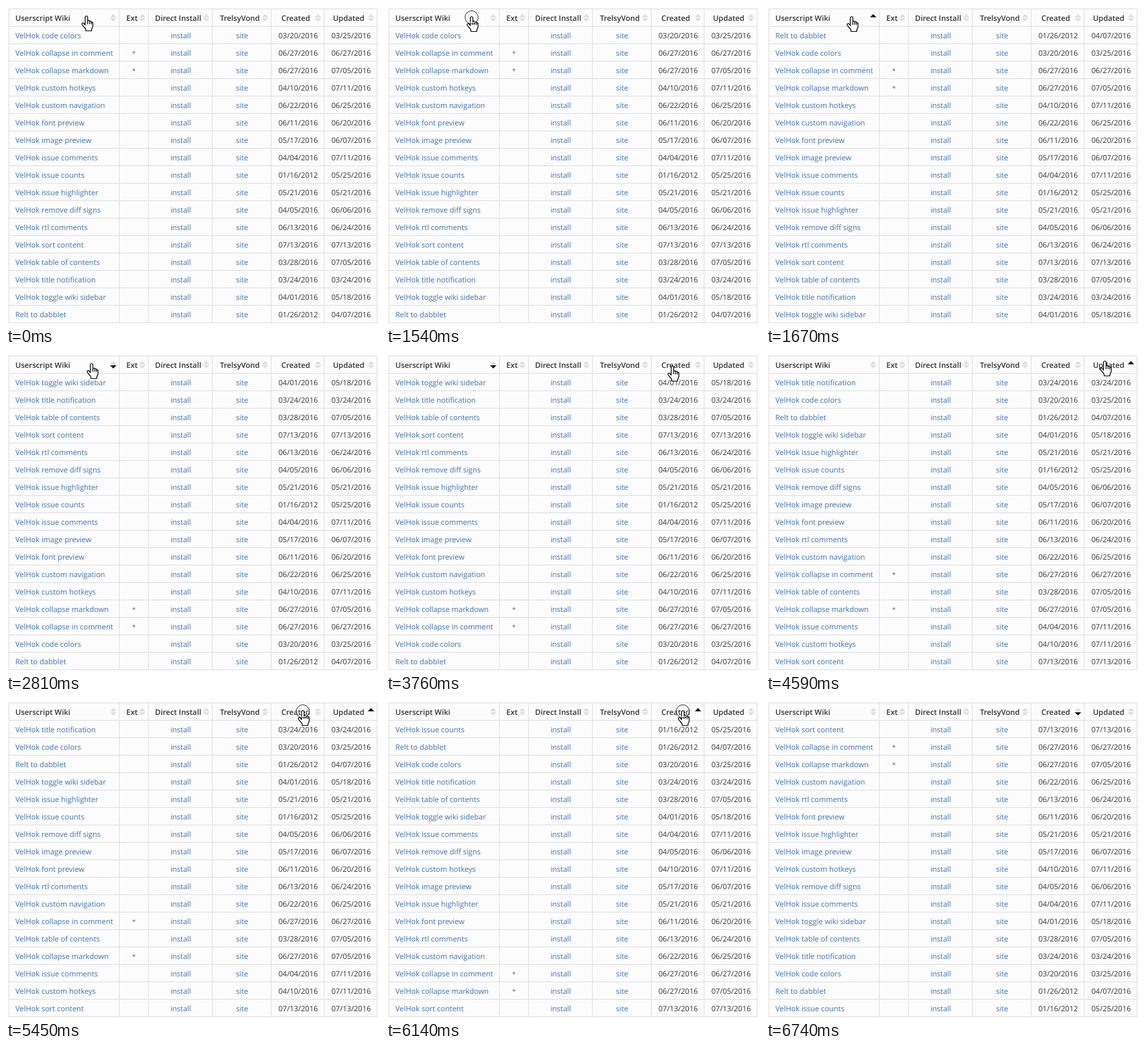
Animation of 579x494 px, one loop 7830 ms. Source, as an HTML page:

```html
<!DOCTYPE html>
<html lang="en">
<head>
<meta charset="utf-8">
<title>Sortable script table</title>
<style>
html, body { margin: 0; width: 100%; height: 100%; overflow: hidden; background: #fff; }
svg { display: block; }
text { font: 11.5px "Open Sans", "Noto Sans", sans-serif; fill: #333; text-rendering: geometricPrecision; }
.mid { text-anchor: middle; }
.link { fill: #3c72b4; }
.star { font-size: 10px; fill: #666; }
.head { font-size: 11.7px; font-weight: 600; }
</style>
</head>
<body>
<svg id="stage" width="579" height="494" viewBox="0 0 579 494">
  <rect x="4" y="4" width="571" height="487" fill="#fcfcfc"/>
  <path id="grid" fill="none" stroke="#ddd"/>
  <g id="table"></g>
  <path id="hand" fill="#fff" stroke="#000" stroke-width="1.2" stroke-linejoin="round"
    d="M5.5 14.5V2.5a2 2 0 0 1 4 0V8.5a1.6 1.6 0 0 1 3 0V9.5a1.4 1.4 0 0 1 2.7 0V11a1.2 1.2 0 0 1 2.3 0V15.5c0 3-2 4-2 6V23.5H6.5V21C5 18 .9 15 .6 13.2c-.3-2 2-2.5 3.1-1.4zM9.5 8.5V13M12.5 9.5V13M15.2 11V13.5"/>
  <path id="arrow" fill="#fff" stroke="#000" d="M.5.8V16.4L4.1 13 6.4 18.4 8.8 17.4 6.5 12.2H11.4z"/>
  <g id="ring" fill="none"><circle r="10" stroke="#000"/><circle r="9" stroke="#fff"/></g>
</svg>
<script>
const LOOP = 7830, ROW = 27, TOP = 4;
const edges = [4, 175, 220, 319, 410, 492, 574];
const titles = ["Userscript Wiki", "Ext", "Direct Install", "TrelsyVond", "Created", "Updated"];
const titleX = [14.5, 195, 266.5, 362, 448.5, 530.5];
const cellX = [14.5, 198, 270.5, 365.5, 452.3, 534.3];
const cellClass = ["link", "mid star", "mid link", "mid link", "mid", "mid"];

// name | created | updated, with * marking an extension
const rows = `VelHok code colors|03/20/2016|03/25/2016
VelHok collapse in comment*|06/27/2016|06/27/2016
VelHok collapse markdown*|06/27/2016|07/05/2016
VelHok custom hotkeys|04/10/2016|07/11/2016
VelHok custom navigation|06/22/2016|06/25/2016
VelHok font preview|06/11/2016|06/20/2016
VelHok image preview|05/17/2016|06/07/2016
VelHok issue comments|04/04/2016|07/11/2016
VelHok issue counts|01/16/2012|05/25/2016
VelHok issue highlighter|05/21/2016|05/21/2016
VelHok remove diff signs|04/05/2016|06/06/2016
VelHok rtl comments|06/13/2016|06/24/2016
VelHok sort content|07/13/2016|07/13/2016
VelHok table of contents|03/28/2016|07/05/2016
VelHok title notification|03/24/2016|03/24/2016
VelHok toggle wiki sidebar|04/01/2016|05/18/2016
Relt to dabblet|01/26/2012|04/07/2016`.split("\n").map(line => {
  const [name, created, updated] = line.split("|");
  return [name.replace("*", ""), name.endsWith("*") ? "*" : "", "install", "site", created, updated];
});

// [time, column, direction]
const sorts = [[0, -1, 1], [1670, 0, 1], [2810, 0, -1], [4590, 5, 1], [5580, 4, 1], [6290, 4, -1]];
// [time, left, top] of the hand
const poses = [[0, 117, 15], [280, 119, 15], [420, 125, 16], [3380, 145, 17], [3520, 212, 18],
  [3640, 345, 20], [3760, 436, 20], [3890, 472, 14], [4040, 499, 13], [4160, 514, 12],
  [4310, 517, 12], [5150, 463, 16], [5300, 452, 16]];
// [from, to] of each mouse press
const presses = [[1540, 1670], [4310, 4590], [5450, 5580], [6140, 6290]];

const $ = id => document.getElementById(id);
function add(parent, tag, attrs, content = "") {
  const el = document.createElementNS("http://www.w3.org/2000/svg", tag);
  for (const key in attrs) el.setAttribute(key, attrs[key]);
  el.textContent = content;
  return parent.appendChild(el);
}
const move = (el, x, y) => el.setAttribute("transform", `translate(${x} ${y})`);
const show = (el, on) => el.setAttribute("visibility", on ? "visible" : "hidden");
const latest = (list, t) => list.findLast(item => item[0] <= t);

let lines = edges.map(x => `M${x + .5} 4V491`).join("");
for (let i = 0; i <= 18; i++) lines += `M4 ${TOP + i * ROW + .5}H575`;
$("grid").setAttribute("d", lines);

const icons = titles.map((title, i) => {
  add($("table"), "text", { x: titleX[i], y: 23, class: i ? "head mid" : "head" }, title);
  const x = edges[i + 1] - 9;
  return ["M-5 17.5H5L0 12.5z", "M-5 19H5L0 24z"].map(d =>
    add($("table"), "path", { d, transform: `translate(${x})` }));
});
const rowEls = rows.map(row => {
  const g = add($("table"), "g");
  row.forEach((value, i) => add(g, "text", { x: cellX[i], y: 19, class: cellClass[i] }, value));
  return g;
});

// Dates compare by year first; ties keep their previous order.
const sortKey = (i, col) => col ? rows[i][col].slice(6) + rows[i][col] : rows[i][0];
let order = rows.map((_, i) => i);
for (const sort of sorts) {
  const [, col, dir] = sort;
  if (col >= 0) order = [...order].sort((a, b) => {
    const p = sortKey(a, col), q = sortKey(b, col);
    return p === q ? 0 : p < q ? -dir : dir;
  });
  sort.push(order);
}

let shown;
function applySort(sort) {
  if (sort === shown) return;
  shown = sort;
  const [, col, dir, list] = sort;
  list.forEach((row, i) => move(rowEls[row], 0, TOP + ROW * (i + 1)));
  icons.forEach(([up, down], i) => {
    const active = i === col;
    up.setAttribute("fill", active && dir > 0 ? "#111" : "#ddd");
    down.setAttribute("fill", active ? "#111" : "#ddd");
    show(down, !(active && dir > 0));
  });
}

function draw() {
  const t = performance.now() % LOOP;
  applySort(latest(sorts, t));
  const [, x, y] = latest(poses, t);
  move($("hand"), x, y);
  move($("ring"), x + 7.5, y + 1.5);
  move($("arrow"), 464, 54);
  show($("hand"), t < 6590);
  show($("ring"), presses.some(([from, to]) => t >= from && t < to));
  show($("arrow"), t >= 6590 && t < 6740);
  requestAnimationFrame(draw);
}
draw();
</script>
</body>
</html>
```
